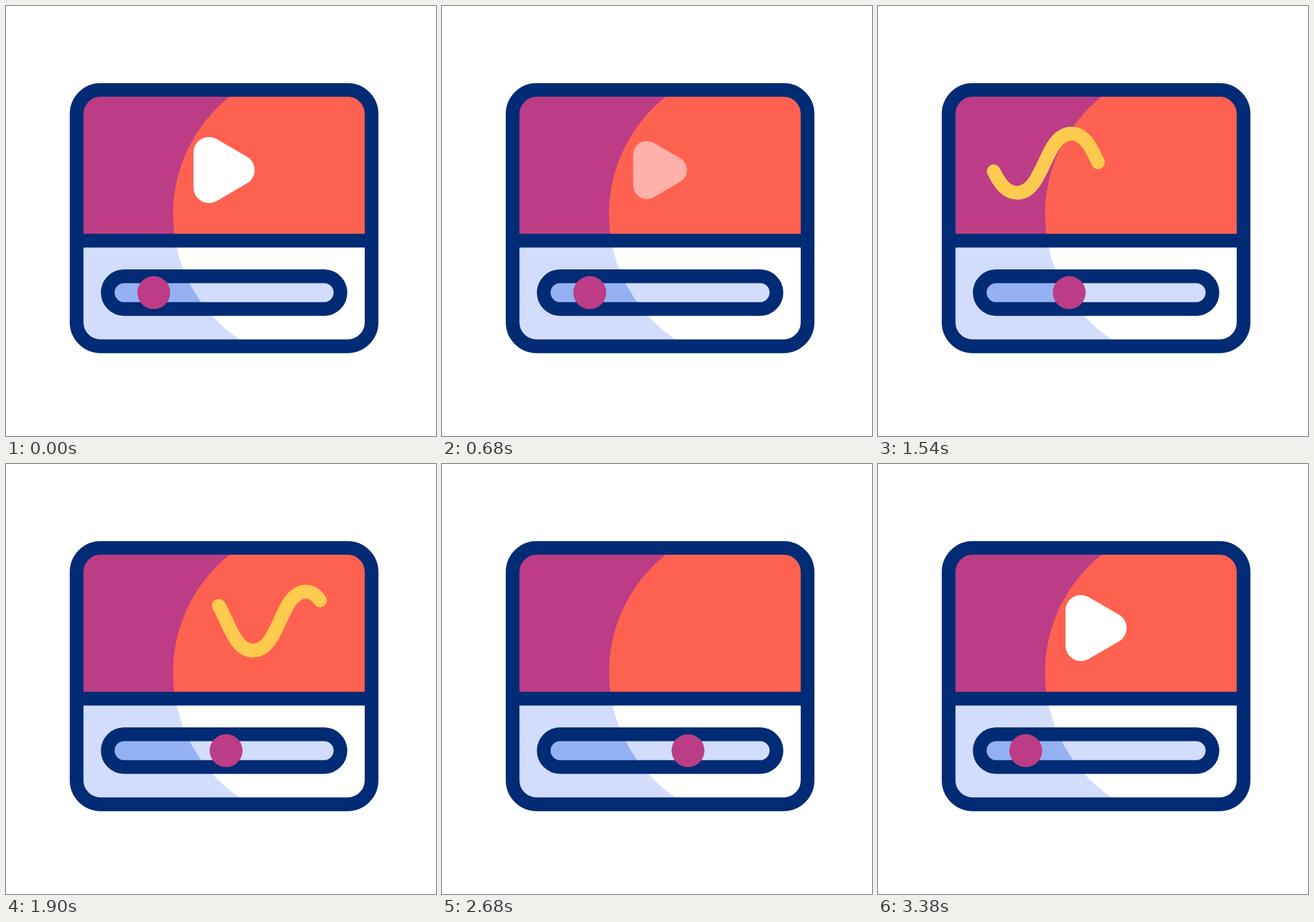
An HTML page with a canvas that plays this animation: 640 by 640 pixels, repeating every 3.62 s.

```html
<!DOCTYPE html>
<html lang="en">
<head>
<meta charset="utf-8">
<title>Video player</title>
<style>
  html, body { margin: 0; width: 100%; height: 100%; overflow: hidden; background: #fff; }
  canvas { display: block; width: 640px; height: 640px; }
</style>
</head>
<body>
<canvas id="stage" width="640" height="640"></canvas>
<script>
const ctx = document.getElementById('stage').getContext('2d');
const LOOP = 3620, STEP = 20, LINE = 20.4;
const NAVY = '#022b75', PURPLE = '#bc3d85', ORANGE = '#ff6150',
      PALE = '#d2dcfd', BLUE = '#94b1f4', YELLOW = '#ffcb4f', WHITE = '#fff';

const lerp = (a, b, k) => a + (b - a) * k;
const progress = (t, from, to) => Math.min(1, Math.max(0, (t - from) / (to - from)));
const ease = k => k * k * (3 - 2 * k);

// keys: [time, value] pairs, eased between neighbours
function track(t, keys) {
  let value = keys[0][1];
  for (let i = 1; i < keys.length; i++) {
    const [t0, v0] = keys[i - 1], [t1, v1] = keys[i];
    if (t >= t0) value = lerp(v0, v1, ease(progress(t, t0, t1)));
  }
  return value;
}

function roundRect(x0, y0, x1, y1, r) {
  const p = new Path2D();
  p.roundRect(x0, y0, x1 - x0, y1 - y0, r);
  return p;
}

const frame = roundRect(105.1, 124.9, 544.1, 506.5, 35.7);
const bar = roundRect(151.4, 402.2, 497.8, 451, 24.4);
const screen = roundRect(105, 125, 544, 349, [35.7, 35.7, 0, 0]);
const panel = roundRect(105, 349, 544, 506.5, [0, 0, 35.7, 35.7]);

const disc = new Path2D();
disc.arc(472.7, 310.3, 224.2, 0, Math.PI * 2);

const play = new Path2D();
const third = Math.PI / 3;
play.arc(302, 218, 23, Math.PI, -third);
play.arc(347.1, 244.15, 23, -third, third);
play.arc(302, 270.3, 23, third, Math.PI);
play.closePath();

// alternating troughs and crests
const bends = [[46, 278], [126, 190], [207, 278], [288, 190],
               [368, 277.7], [447, 190], [518, 280], [590, 190]];
const wave = new Path2D();
wave.moveTo(...bends[0]);
for (let i = 1; i < bends.length; i++) {
  const [x0, y0] = bends[i - 1], [x1, y1] = bends[i];
  const mid = (x0 + x1) / 2;
  wave.bezierCurveTo(mid, y0, mid, y1, x1, y1);
}

function twoTone(area, back, front) {
  ctx.save();
  ctx.clip(area);
  ctx.fillStyle = back;
  ctx.fill(area);
  ctx.fillStyle = front;
  ctx.fill(disc);
  ctx.restore();
}

function drawWave(t) {
  if (t < 990 || t > 2540) return;
  const tail = 416 + 0.594 * (t - 1900);
  ctx.save();
  ctx.clip(screen);
  ctx.setLineDash([238, 3000]);
  ctx.lineDashOffset = -tail;
  ctx.lineCap = 'round';
  ctx.strokeStyle = YELLOW;
  ctx.stroke(wave);
  ctx.restore();
}

function drawPlay(t) {
  const out = t < 1500;
  const alpha = out ? track(t, [[580, 1], [780, 0]]) : track(t, [[2840, 0], [3040, 1]]);
  if (!alpha) return;
  const scale = out
    ? track(t, [[200, 1], [580, 0.76], [780, 1]])
    : track(t, [[2800, 0.9], [3090, 1.053], [3375, 1]]);
  ctx.save();
  ctx.globalAlpha = alpha;
  ctx.translate(324.6, 244.15);
  ctx.scale(scale, scale);
  ctx.translate(-324.6, -244.15);
  ctx.fillStyle = WHITE;
  ctx.fill(play);
  ctx.restore();
}

function knobX(t) {
  const start = 219.9, end = 404;
  return t < 2540
    ? lerp(start, end, progress(t, 998, 2540))
    : lerp(end, start, ease(progress(t, 2540, 3020)));
}

function draw(t) {
  ctx.fillStyle = WHITE;
  ctx.fillRect(0, 0, 640, 640);
  ctx.lineWidth = LINE;

  twoTone(screen, PURPLE, ORANGE);
  twoTone(panel, PALE, WHITE);
  twoTone(bar, BLUE, PALE);
  drawWave(t);
  drawPlay(t);

  ctx.strokeStyle = NAVY;
  ctx.stroke(bar);
  ctx.stroke(frame);
  ctx.fillStyle = NAVY;
  ctx.fillRect(105, 339, 439, 20.5);

  ctx.fillStyle = PURPLE;
  ctx.beginPath();
  ctx.arc(knobX(t), 426.6, 24.5, 0, Math.PI * 2);
  ctx.fill();
}

const begin = performance.now();
function tick() {
  const t = (performance.now() - begin) % LOOP;
  draw(Math.floor(t / STEP) * STEP);
  requestAnimationFrame(tick);
}
tick();
</script>
</body>
</html>
```
